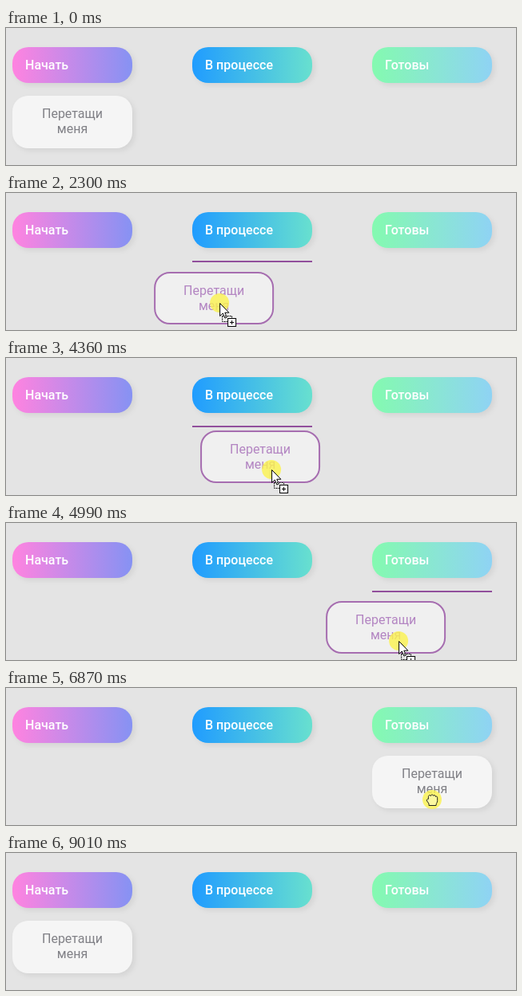
An HTML page for the animation above (9.8 s loop, 638 px wide and 172 px high).

```html
<!DOCTYPE html>
<html lang="ru">
<head>
<meta charset="utf-8">
<title>Доска задач</title>
<style>
  html, body { margin: 0; width: 100%; height: 100%; overflow: hidden; background: #e4e4e4; }
  svg { display: block; width: 638px; height: 172px; }
  text { font: 16px Roboto, sans-serif; }
  .head { fill: #fff; font-weight: 500; }
  .mid { text-anchor: middle; }
  .soft { filter: drop-shadow(3px 3px 3px rgba(0, 0, 0, .07)); }
</style>
</head>
<body>
<svg viewBox="0 0 638 172">
  <defs id="defs"></defs>
  <g id="heads"></g>
  <rect id="line" y="85" width="150" height="2" fill="#914f9c"/>
  <g id="card">
    <rect class="soft" width="150" height="66" rx="20" fill="#f5f5f5"/>
    <g class="mid" fill="#808086"><text x="75" y="28">Перетащи</text><text x="75" y="47">меня</text></g>
  </g>
  <g id="ghost">
    <rect x="1" y="1" width="148" height="64" rx="19" fill="#f5f5f5" fill-opacity=".75" stroke="#a66db0" stroke-width="2"/>
    <g class="mid" fill="#b385c2"><text x="75" y="29">Перетащи</text><text x="75" y="48">меня</text></g>
  </g>
  <g id="cursor">
    <circle r="12" fill="#fbf24e" fill-opacity=".8"/>
    <g id="arrow">
      <path d="M.5 .5V16.5L4.2 13L6.8 19L9.2 18L6.7 12.2H11.8Z" fill="#fff" stroke="#000"/>
    </g>
    <g id="copy">
      <rect x="3.5" y="16.5" width="12" height="7" fill="none" stroke="#fff"/>
      <rect x="3.5" y="16.5" width="12" height="7" fill="none" stroke="#000" stroke-dasharray="2 1"/>
      <rect x="10.5" y="19.5" width="10" height="10" fill="#fff" stroke="#000"/>
      <path d="M13 24.5h5M15.5 22v5" stroke="#000"/>
    </g>
    <g id="deny" fill="none" stroke="#25240c" stroke-width="2.8">
      <circle r="7.8"/><path d="M-5.5 -5.5L5.5 5.5"/>
    </g>
    <path id="hand" fill="#fbf8a0" stroke="#222" stroke-linejoin="round"
      d="M-4 7.5V5.2L-6.3 2C-7 .5 -6.3 -1 -4.6 -.6V-3.4C-4.6 -5.8 -2 -6 -1.6 -4.4C-1.4 -6.6 1.3 -6.6 1.5 -4.6C2 -6 4.2 -5.8 4.3 -3.6C5.2 -4.6 6.8 -3.8 6.7 -2.2V1.5C6.7 4 5 4.6 5 7.5Z"/>
  </g>
</svg>
<script>
const LOOP = 9800, COLS = [8, 233, 458];
const $ = id => document.getElementById(id);

const heads = [
  ['Начать', '#ff83e0', '#8692f3'],
  ['В процессе', '#209cff', '#68e0cf'],
  ['Готовы', '#84fab0', '#8fd3f4']
];
heads.forEach(([label, from, to], i) => {
  $('defs').innerHTML += `<linearGradient id="g${i}"><stop stop-color="${from}"/><stop offset="1" stop-color="${to}"/></linearGradient>`;
  $('heads').innerHTML += `<rect class="soft" x="${COLS[i]}" y="24" width="150" height="45" rx="20" fill="url(#g${i})"/>
    <text class="head" x="${COLS[i] + 16}" y="52">${label}</text>`;
});

// time, pointer x, pointer y, grip x, grip y
const keys = [
  [690, 25, 185, 75, 40],
  [1180, 83, 125, 75, 40],
  [1380, 83, 125, 75, 40],
  [2300, 267, 138, 82, 39],
  [2790, 315, 135, 76, 40],
  [4020, 315, 135, 82, 50],
  [4360, 332, 140, 89, 49],
  [4990, 491, 148, 91, 50],
  [5540, 533, 140, 82, 50],
  [6990, 533, 140, 75, 55],
  [7760, 167, 134, 76, 56],
  [8030, 109, 133, 76, 56],
  [8230, 109, 133, 76, 56],
  [9010, 4, 190, 76, 56]
];
// start, end, column left, column reached
const drags = [[1380, 2760, 0, 1], [4020, 5510, 1, 2], [6990, 8230, 2, 0]];

const slope = (i, c) => keys[i] && keys[i + 1]
  ? (keys[i + 1][c] - keys[i][c]) / (keys[i + 1][0] - keys[i][0]) : 0;

// harmonic mean keeps the curve free of overshoot
function tangent(i, c) {
  const a = slope(i - 1, c), b = slope(i, c);
  return a * b > 0 ? 2 * a * b / (a + b) : 0;
}

function track(t, c) {
  let i = 0;
  while (i < keys.length - 2 && t >= keys[i + 1][0]) i++;
  const [p, q] = [keys[i], keys[i + 1]];
  const d = q[0] - p[0];
  const u = Math.min(1, Math.max(0, (t - p[0]) / d));
  const s = u * u * (3 - 2 * u);
  return p[c] + (q[c] - p[c]) * s
    + d * tangent(i, c) * u * (1 - u) * (1 - u)
    - d * tangent(i + 1, c) * u * u * (1 - u);
}

const show = (id, on) => $(id).setAttribute('visibility', on ? 'inherit' : 'hidden');
const move = (id, x, y) => $(id).setAttribute('transform', `translate(${x.toFixed(2)} ${y.toFixed(2)})`);
const inside = (x, left) => x >= left && x <= left + 150;

function draw(t) {
  const [x, y, gx, gy] = [1, 2, 3, 4].map(c => track(t, c));
  const drag = drags.find(d => t >= d[0] && t < d[1]);
  const done = drags.filter(d => t >= d[1]).pop();
  const home = COLS[done ? done[3] : 0];
  const over = COLS.find(left => inside(x, left));
  const onCard = !drag && inside(x, home) && y >= 85 && y <= 151;
  const target = !!drag && over !== undefined;

  move('card', home, 85);
  move('ghost', x - gx, y - gy);
  move('cursor', x, y);
  if (target) $('line').setAttribute('x', over);

  show('card', !drag);
  show('ghost', drag);
  show('line', target);
  show('cursor', t >= 690 && t < 9010);
  show('hand', onCard);
  show('deny', drag && !target);
  show('copy', target);
  show('arrow', target || (!drag && !onCard));
}

const start = performance.now();
function tick() {
  draw((performance.now() - start) % LOOP);
  requestAnimationFrame(tick);
}
draw(0);
tick();
</script>
</body>
</html>
```
